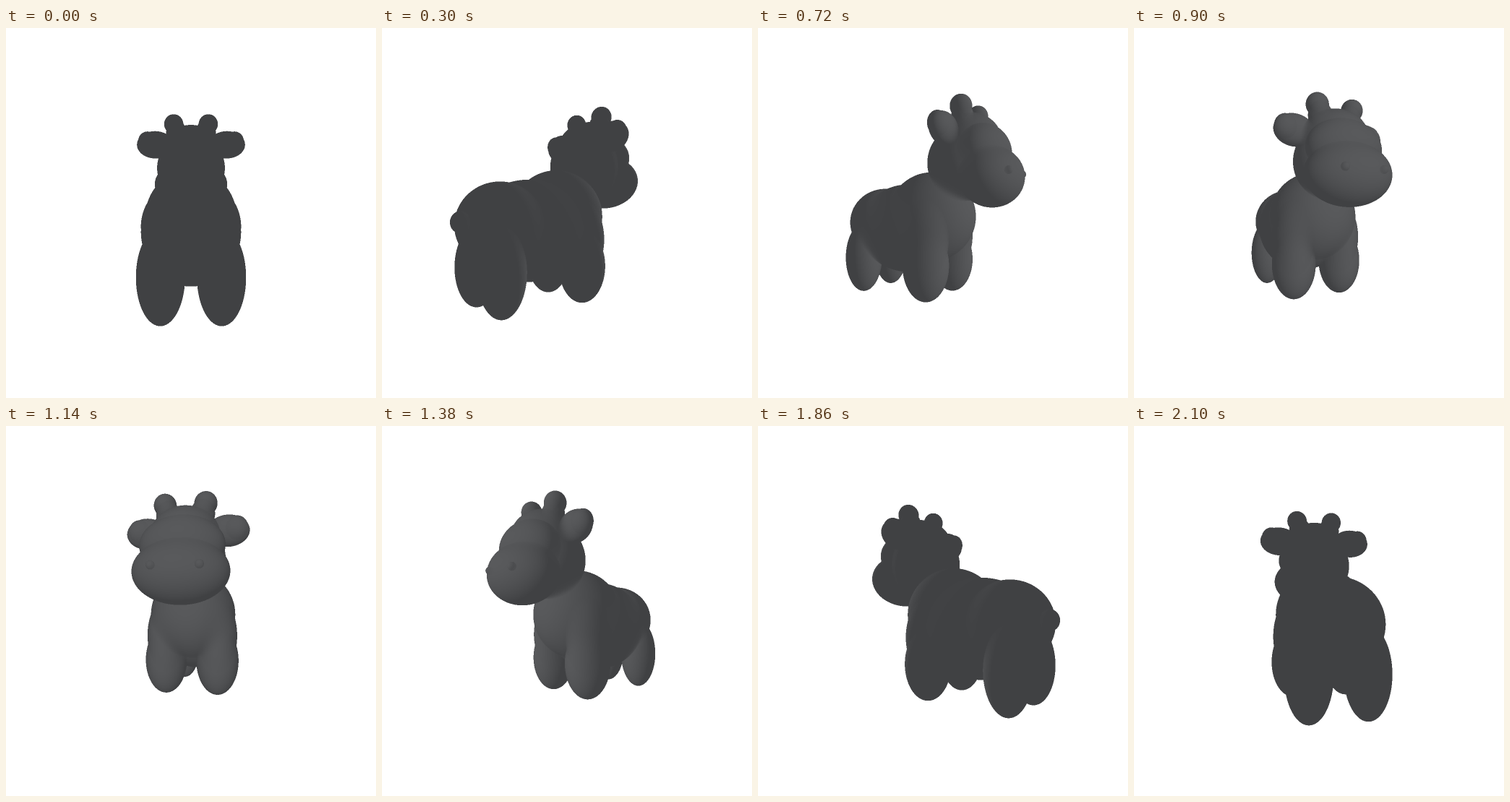
These frames come from a looping animation (512x512 px, 2.16 s). An HTML page with a canvas:

```html
<!DOCTYPE html>
<html lang="en">
<head>
<meta charset="utf-8">
<title>Turning cow</title>
<style>
html, body { margin: 0; width: 100%; height: 100%; overflow: hidden; background: #fff; }
canvas { display: block; width: 512px; height: 512px; }
</style>
</head>
<body>
<canvas id="stage" width="512" height="512"></canvas>
<script>
const SIZE = 512, SS = 2, WIDE = SIZE * SS, MID = SIZE / 2;
const CAMERA = 450;          // camera distance from the turning axis
const STEPS = 36, STEP_MS = 60;
const BLEND = 6;             // softness where two parts meet
const LIGHT = { y: -0.28, z: 0.96 };
const DARK = 64, GAIN = 25;

// Ellipsoids: centre side, down, forward, then the radii along the same axes.
const middle = [
  [0, 14, -102, 53, 51, 52],     // rump
  [0, 22, -58, 59, 64, 82],      // belly
  [0, 5, -18, 60, 62, 62],       // chest
  [0, 10, -151, 9, 12, 11],      // tail
  [0, -66, 32, 50, 50, 48],      // skull
  [0, -95, 40, 44, 36, 42],      // forehead
  [0, -78, 63, 52, 36, 31],      // nose bridge
  [0, -46, 72, 58, 39, 39]       // muzzle
];
const paired = [
  [31, 65, -117, 25, 50, 27],    // hind leg
  [36, 68, -5, 29, 47, 30.5],    // front leg
  [36, 34, -8, 27, 52, 34],      // shoulder
  [26, -134, 41, 14.5, 14.5, 14],// horn tip
  [22, -121, 41, 15.5, 18, 14],  // horn base
  [53, -101, 32, 27, 20, 14],    // ear
  [64, -105, 30, 14, 15, 12],    // ear tip
  [27, -50, 103, 5, 5, 5]        // nostril
];
const mirror = ([side, ...rest]) => [-side, ...rest];
const parts = [...middle, ...paired, ...paired.map(mirror)];

const stage = document.getElementById('stage').getContext('2d');
const big = document.createElement('canvas');
big.width = big.height = WIDE;
const bigCtx = big.getContext('2d');
const image = bigCtx.createImageData(WIDE, WIDE);
const weight = new Float64Array(WIDE * WIDE);
const shade = new Float64Array(WIDE * WIDE);
const toPixel = v => Math.max(0, Math.min(WIDE, Math.round((v + MID) * SS)));

function addPart([cx, cy, cz, rx, ry, rz], sin, cos) {
  // Generous screen bounds of the ellipsoid
  const across = cz * sin + cx * cos, near = cx * sin - cz * cos;
  const halfW = Math.hypot(rx * cos, rz * sin), halfD = Math.hypot(rx * sin, rz * cos);
  const scale = CAMERA / (CAMERA - near - halfD);
  const padX = halfW * scale + 12, padY = ry * scale + 12;
  const midScale = CAMERA / (CAMERA - near);
  const x0 = toPixel(across * midScale - padX), x1 = toPixel(across * midScale + padX);
  const y0 = toPixel(cy * midScale - padY), y1 = toPixel(cy * midScale + padY);

  // Ray origin in the space where the ellipsoid is a unit sphere
  const ox = (CAMERA * sin - cx) / rx, oy = -cy / ry, oz = (-CAMERA * cos - cz) / rz;
  const c = ox * ox + oy * oy + oz * oz - 1;
  for (let py = y0; py < y1; py++) {
    const dy = ((py + 0.5) / SS - MID) / ry;
    for (let px = x0; px < x1; px++) {
      const sx = (px + 0.5) / SS - MID;
      const dx = (sx * cos - CAMERA * sin) / rx;
      const dz = (sx * sin + CAMERA * cos) / rz;
      const a = dx * dx + dy * dy + dz * dz;
      const b = ox * dx + oy * dy + oz * dz;
      const disc = b * b - a * c;
      if (disc <= 0) continue;
      const t = (-b - Math.sqrt(disc)) / a;
      const nx = (ox + dx * t) / rx, ny = (oy + dy * t) / ry, nz = (oz + dz * t) / rz;
      const facing = (ny * LIGHT.y + nz * LIGHT.z) / Math.sqrt(nx * nx + ny * ny + nz * nz);
      const w = Math.exp(CAMERA * (1 - t) / BLEND);
      const i = py * WIDE + px;
      weight[i] += w;
      shade[i] += w * Math.max(0, facing * 1.2 - 0.2);
    }
  }
}

function render(step) {
  const angle = step / STEPS * 2 * Math.PI;
  weight.fill(0);
  shade.fill(0);
  for (const part of parts) addPart(part, Math.sin(angle), Math.cos(angle));
  const data = image.data;
  data.fill(255);
  for (let i = 0; i < weight.length; i++) {
    if (!weight[i]) continue;
    const v = DARK + GAIN * shade[i] / weight[i];
    data[i * 4] = v;
    data[i * 4 + 1] = v + 1;
    data[i * 4 + 2] = v + 3;
  }
  bigCtx.putImageData(image, 0, 0);
  const view = document.createElement('canvas');
  view.width = view.height = SIZE;
  view.getContext('2d').drawImage(big, 0, 0, SIZE, SIZE);
  return view;
}

const views = [];
let shown = -1;
function draw() {
  const step = Math.floor(performance.now() / STEP_MS) % STEPS;
  if (step !== shown) {
    views[step] ??= render(step);
    stage.drawImage(views[step], 0, 0);
    shown = step;
  }
  requestAnimationFrame(draw);
}
draw();
</script>
</body>
</html>
```
